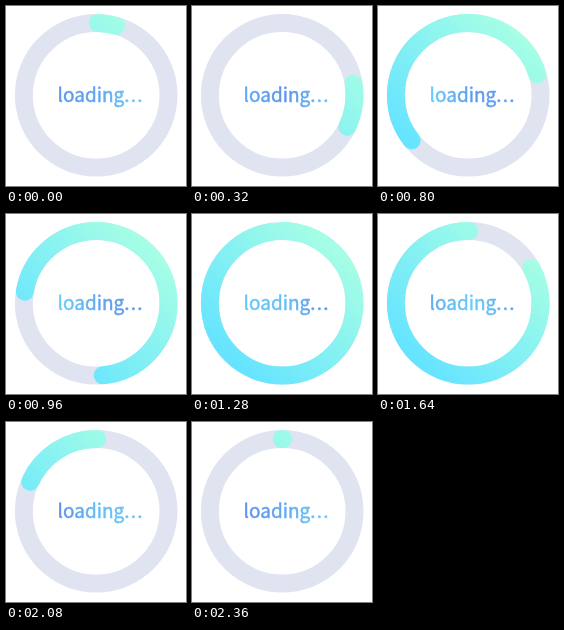
Animation, 180 px wide and 180 px high, one loop 2400 ms. Source, as an HTML page:

```html
<!DOCTYPE html>
<html lang="en">
<head>
<meta charset="utf-8">
<title>Loading ring</title>
<style>
  html, body { margin: 0; width: 100%; height: 100%; overflow: hidden; background: #fff; }
  svg { display: block; width: 180px; height: 180px; }
  circle { fill: none; stroke-width: 18; }
  text {
    font: 19px "Noto Sans CJK SC", "Noto Sans CJK JP", "Noto Sans", sans-serif;
    fill: url(#ink); stroke: url(#ink); stroke-width: .45;
  }
  tspan { letter-spacing: 1.2px; }
</style>
</head>
<body>
<svg viewBox="0 0 180 180">
  <defs>
    <linearGradient id="mint" gradientUnits="userSpaceOnUse" x1="150" y1="30" x2="40" y2="145">
      <stop offset="0" stop-color="#a8ffe4"/>
      <stop offset="1" stop-color="#66e4ff"/>
    </linearGradient>
    <linearGradient id="ink" gradientUnits="userSpaceOnUse" x1="54" y1="0" x2="136" y2="0">
      <stop offset="0"/>
      <stop offset=".5"/>
      <stop offset="1"/>
    </linearGradient>
  </defs>
  <circle cx="90.2" cy="89.3" r="72.3" stroke="#e0e4f1"/>
  <circle id="arc" cx="90.2" cy="89.3" r="72.3" stroke="url(#mint)" stroke-linecap="round" pathLength="360"/>
  <text x="51.6" y="95.5">loading<tspan>...</tspan></text>
</svg>
<script>
const LOOP = 2400;
const BLUE = [91, 141, 236], CYAN = [102, 210, 253];
const arc = document.getElementById('arc');
const stops = document.querySelectorAll('#ink stop');

const progress = (t, from, to) => Math.min(1, Math.max(0, (t - from) / (to - from)));
const easeInOut = p => p < .5 ? 2 * p * p : 1 - 2 * (1 - p) ** 2;

function draw(t) {
  // The arc turns once while it grows, then its tail catches up with its head.
  const turn = progress(t, 0, 1290);
  const grow = progress(t, 260, 1310);
  const erased = 360 * easeInOut(progress(t, 1330, 2410));
  const tail = 360 * turn - 10 * Math.sin(2 * Math.PI * turn) + erased;
  const length = 15 + 345 * (grow + .2 * grow * grow * (1 - grow)) - erased;
  const dash = Math.min(359.9, length);
  arc.setAttribute('stroke-dasharray', `${dash} ${360 - dash}`);
  arc.setAttribute('stroke-dashoffset', 89 - tail);

  // A wave of cyan runs through the word from left to right.
  stops.forEach((stop, i) => {
    const mix = .5 + .45 * Math.cos(2 * Math.PI * (t - 1000 - 700 * i) / LOOP);
    const rgb = BLUE.map((c, j) => Math.round(c + (CYAN[j] - c) * mix));
    stop.setAttribute('stop-color', `rgb(${rgb})`);
  });
}

const start = performance.now();
function tick() {
  draw((performance.now() - start) % LOOP);
  requestAnimationFrame(tick);
}
tick();
</script>
</body>
</html>
```
